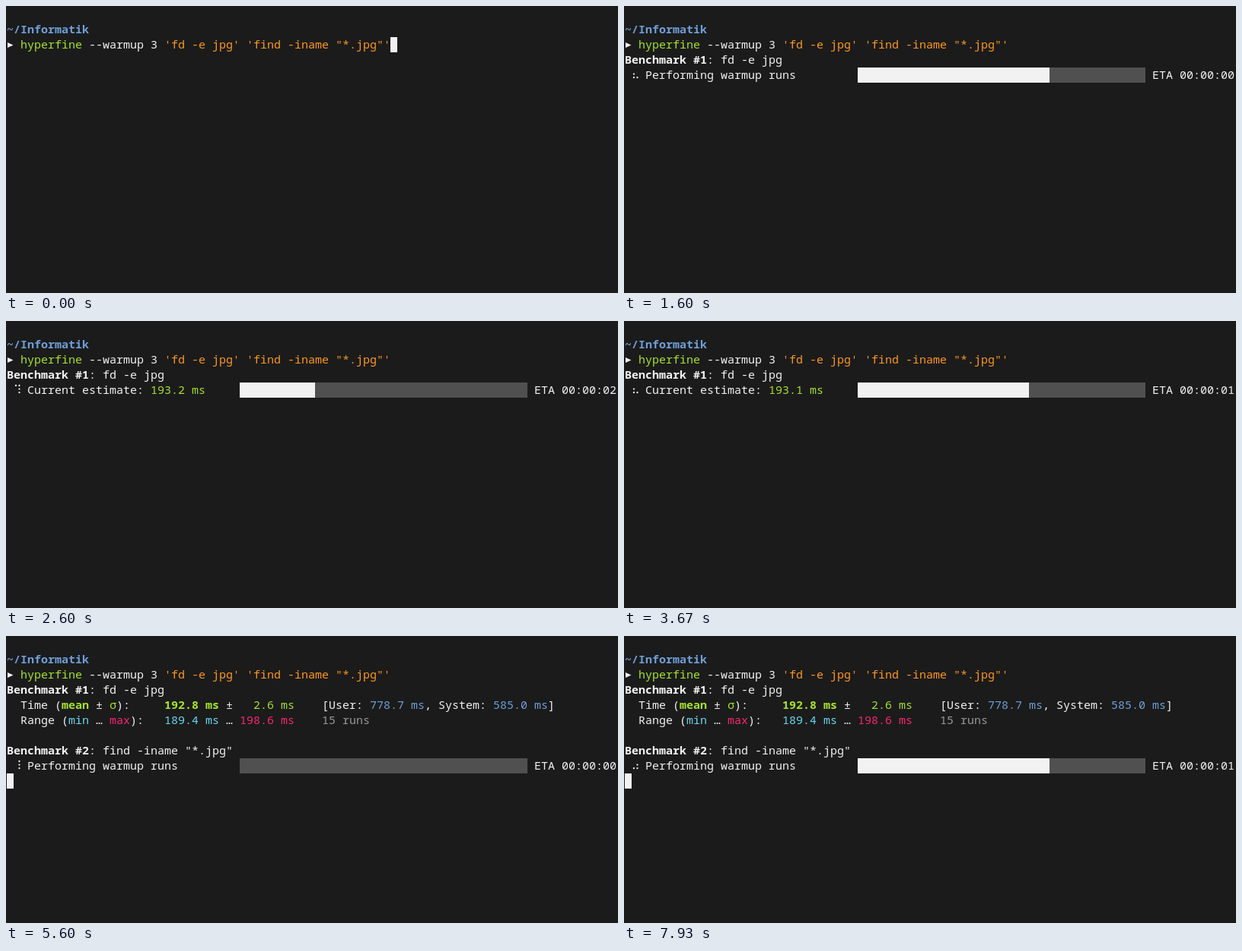
These frames come from a looping animation (804x378 px, 8 s). An HTML page with a canvas:

```html
<!DOCTYPE html>
<html lang="en">
<head>
<meta charset="utf-8">
<title>Terminal benchmark</title>
<style>
html, body { margin: 0; width: 100%; height: 100%; overflow: hidden; background: #1b1b1b; }
canvas { display: block; }
</style>
</head>
<body>
<canvas id="term" width="804" height="378"></canvas>
<script>
const ctx = document.getElementById('term').getContext('2d');

const LOOP = 8000, FPS = 15;
const CELL_W = 9, CELL_H = 20;
const BAR_COL = 34, BAR_CELLS = 42;
const TICK = 80, BLINK = 600;

const BG = '#1b1b1b', FG = '#f2f2f2', TRACK = '#505050', GRAY = '#999999';
const GREEN = '#a6e22e', ORANGE = '#fd971f', BLUE = '#6f9fd8', CYAN = '#66d9ef', PINK = '#f92672';

const SPINNER = '⠋⠙⠹⠸⠼⠴⠦⠧⠇';
const ESTIMATES = [194.1, 193.6, 193.4, 193.2, 193.5, 193.0, 192.7,
                   192.9, 193.1, 192.8, 192.6, 192.9, 192.7, 192.8];

// Start times of the stages
const SPAWN = 590, WARMUP_1 = 1200, RUNS = 1795, WARMUP_2 = 4710;

const colX = col => 1 + col * CELL_W;
const rowY = row => 1 + row * CELL_H;
const clamp = (v, lo, hi) => Math.min(hi, Math.max(lo, v));

function fillCells(col, row, count, color) {
  ctx.fillStyle = color;
  ctx.fillRect(colX(col), rowY(row), count * CELL_W, CELL_H);
}

// Each run is [text, color, bold]
function write(col, row, ...runs) {
  for (const [text, color = FG, bold] of runs) {
    ctx.font = `${bold ? 700 : 400} 15px "Noto Sans Mono", "DejaVu Sans Mono", monospace`;
    ctx.fillStyle = color;
    ctx.fillText(text, colX(col), rowY(row) + 15);
    col += text.length;
  }
}

// Braille bits: 0-2 run down the left column, 3-5 down the right
function drawSpinner(row, tick) {
  const bits = SPINNER.charCodeAt(tick % SPINNER.length) - 0x2800;
  ctx.fillStyle = FG;
  for (let i = 0; i < 6; i++) {
    if (!(bits >> i & 1)) continue;
    ctx.beginPath();
    ctx.arc(i < 3 ? 13 : 17.5, rowY(row) + 4 + (i % 3) * 4.6, 1.15, 0, Math.PI * 2);
    ctx.fill();
  }
}

function progress(row, tick, label, part, eta) {
  drawSpinner(row, tick);
  write(3, row, ...label);
  fillCells(BAR_COL, row, BAR_CELLS, TRACK);
  fillCells(BAR_COL, row, Math.floor(part * BAR_CELLS + 1e-6), FG);
  write(77, row, ['ETA 00:00:0' + eta]);
}

function prompt() {
  write(0, 1, ['~/Informatik', BLUE, true]);
  ctx.fillStyle = FG;
  ctx.beginPath();
  ctx.moveTo(2, 48);
  ctx.lineTo(9.5, 51.5);
  ctx.lineTo(2, 55);
  ctx.fill();
  write(2, 2, ['hyperfine', GREEN], [' --warmup 3 '], [`'fd -e jpg' 'find -iname "*.jpg"'`, ORANGE]);
}

function title(row, number, command) {
  write(0, row, ['Benchmark #' + number, FG, true], [': ' + command]);
}

function results() {
  write(2, 4, ['Time ('], ['mean', GREEN, true], [' ± '], ['σ', GREEN], ['):']);
  write(23, 4, ['192.8 ms', GREEN, true], [' ±   '], ['2.6 ms', GREEN]);
  write(46, 4, ['[User: '], ['778.7 ms', BLUE], [', System: '], ['585.0 ms', BLUE], [']']);
  write(2, 5, ['Range ('], ['min', CYAN], [' … '], ['max', PINK], ['):']);
  write(23, 5, ['189.4 ms', CYAN], [' … '], ['198.6 ms', PINK]);
  write(46, 5, ['15 runs', GRAY]);
}

function measureRuns(t, tick) {
  const done = Math.floor(t < 3202 ? (t - RUNS) / 201 : 7 + (t - 3202) / 189.7);
  const label = done < 1
    ? [['Initial time measurement']]
    : [['Current estimate: '], [ESTIMATES[Math.min(done, 14) - 1].toFixed(1) + ' ms', GREEN]];
  const eta = done < 1 ? 0 : done < 7 ? 2 : done < 11 ? 1 : 0;
  progress(4, tick, label, done / 15, eta);
}

function draw(t) {
  ctx.fillStyle = BG;
  ctx.fillRect(0, 0, 804, 378);
  prompt();

  const ticks = start => Math.floor((t - start) / TICK + 1e-6);
  const warmup = [['Performing warmup runs']];
  let cursor = [56, 2];

  if (t > WARMUP_1) title(3, 1, 'fd -e jpg');

  if (t > WARMUP_2) {
    results();
    title(7, 2, 'find -iname "*.jpg"');
    const done = Math.floor((t - WARMUP_2) / 1280);
    progress(8, 1 + ticks(WARMUP_2), warmup, done / 3, done > 1 ? 1 : 0);
    cursor = [0, 9];
  } else if (t > RUNS) {
    measureRuns(t, 1 + ticks(RUNS));
    cursor = [0, 5];
  } else if (t > WARMUP_1) {
    progress(4, 1 + ticks(WARMUP_1), warmup, Math.floor((t - WARMUP_1) / 199) / 3, 0);
    cursor = [0, 5];
  } else if (t > SPAWN) {
    const part = clamp((t - 655) / 545, 0, 1);
    const eta = part > 0 && part < 0.6 ? 1 : 0;
    progress(3, ticks(SPAWN), [['Measuring shell spawning time']], part, eta);
    cursor = [0, 4];
  }

  if (Math.floor((t - 40) / BLINK) % 2) fillCells(...cursor, 1, FG);
}

// The screen refreshes in whole steps of 1/15 s
function loop(now) {
  const t = now % LOOP;
  draw(Math.floor((t + 5) * FPS / 1000) * 1000 / FPS);
  requestAnimationFrame(loop);
}
requestAnimationFrame(loop);
</script>
</body>
</html>
```
